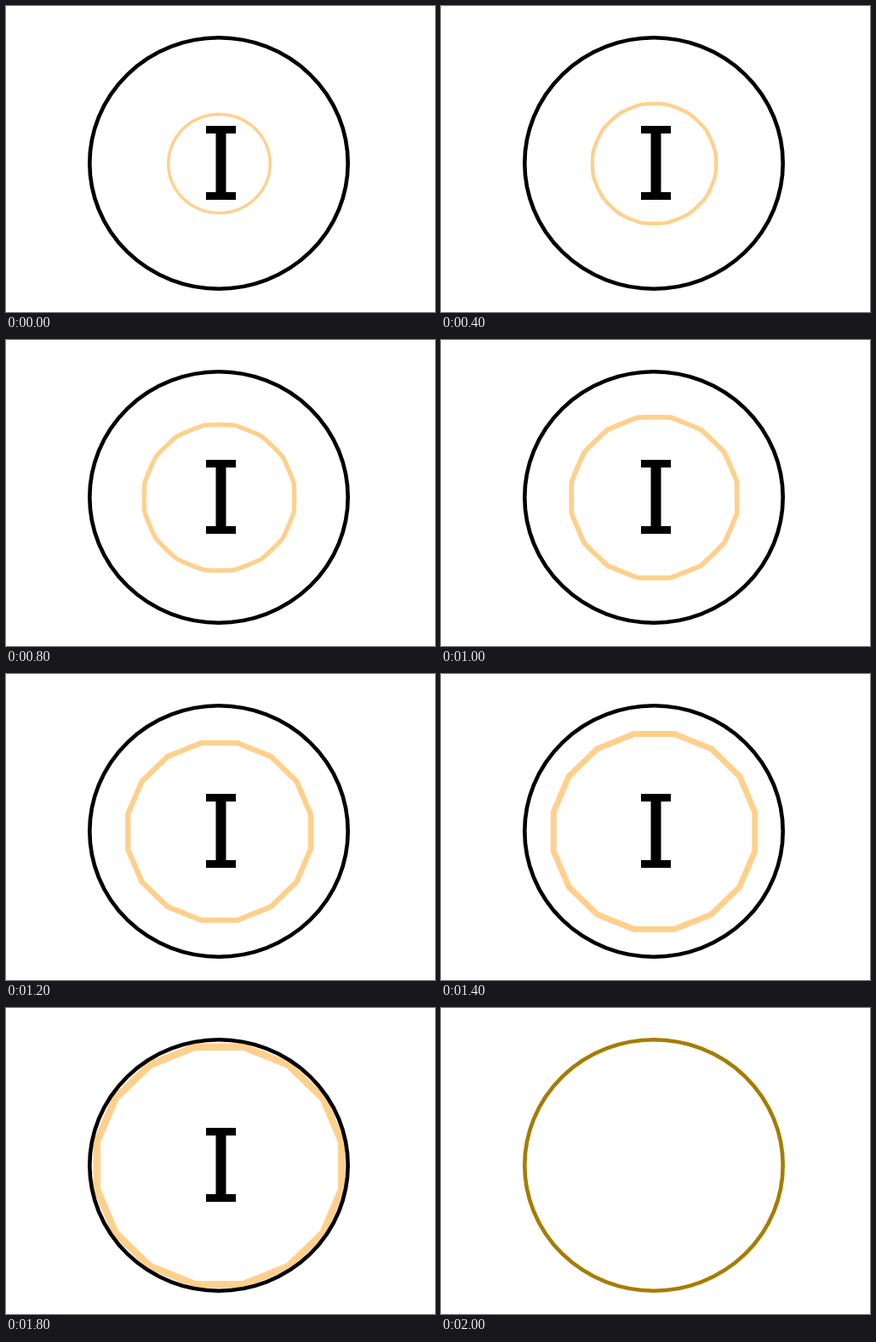
Recreate the animation shown at these times as an HTML page with a canvas. Size 504x360 px, loop 2.5 s.

```html
<!DOCTYPE html>
<html lang="en">
<head>
<meta charset="utf-8">
<title>Expanding ring</title>
<style>
  html, body { margin: 0; width: 100%; height: 100%; overflow: hidden; background: #fff; }
  canvas { display: block; }
</style>
</head>
<body>
<canvas id="stage" width="504" height="360" role="img" aria-label="I"></canvas>
<script>
const ctx = document.getElementById('stage').getContext('2d');
const LOOP = 2500, STEP = 100, LAST = 20, GROWTH = 1.05;
const BLACK = '#000', WAVE = '#ffd08c', GOLD = '#a67c00';

function ellipsePath(rx, ry) {
  ctx.beginPath();
  ctx.ellipse(250, 185, rx, ry, 0, 0, Math.PI * 2);
}

function outerRing(color) {
  ellipsePath(151.7, 147.7);
  ctx.lineWidth = 4.6;
  ctx.strokeStyle = color;
  ctx.stroke();
}

// The wave starts round and gains sixteen flat sides as it grows.
function wave(n) {
  const scale = GROWTH ** n;
  const line = 3.5 * scale;
  const rx = (123 * scale - line) / 2;
  const ry = (119.6 * scale - line) / 2;
  const flat = Math.min(1, n / 12);
  const side = Math.PI / 8;
  ctx.save();
  ellipsePath(152, 148);
  ctx.clip();
  ctx.beginPath();
  for (let i = 0; i < 256; i++) {
    const a = i / 128 * Math.PI;
    const off = a - Math.round(a / side) * side;
    const r = 1 + flat * (1 / Math.cos(off) - 1);
    ctx.lineTo(250.5 + rx * r * Math.cos(a), 185.4 + ry * r * Math.sin(a));
  }
  ctx.closePath();
  ctx.lineWidth = line;
  ctx.strokeStyle = WAVE;
  ctx.stroke();
  ctx.restore();
}

function letter() {
  ctx.fillStyle = BLACK;
  ctx.fillRect(235, 141, 35, 9);
  ctx.fillRect(246.5, 141, 12, 87);
  ctx.fillRect(235, 219, 35, 9);
}

function draw(time) {
  const n = Math.min(LAST, Math.floor(time % LOOP / STEP));
  ctx.fillStyle = '#fff';
  ctx.fillRect(0, 0, 504, 360);
  if (n < LAST) {
    wave(n);
    outerRing(BLACK);
    letter();
  } else {
    outerRing(GOLD);
  }
}

const start = performance.now();
function tick() {
  draw(performance.now() - start);
  requestAnimationFrame(tick);
}
tick();
</script>
</body>
</html>
```
